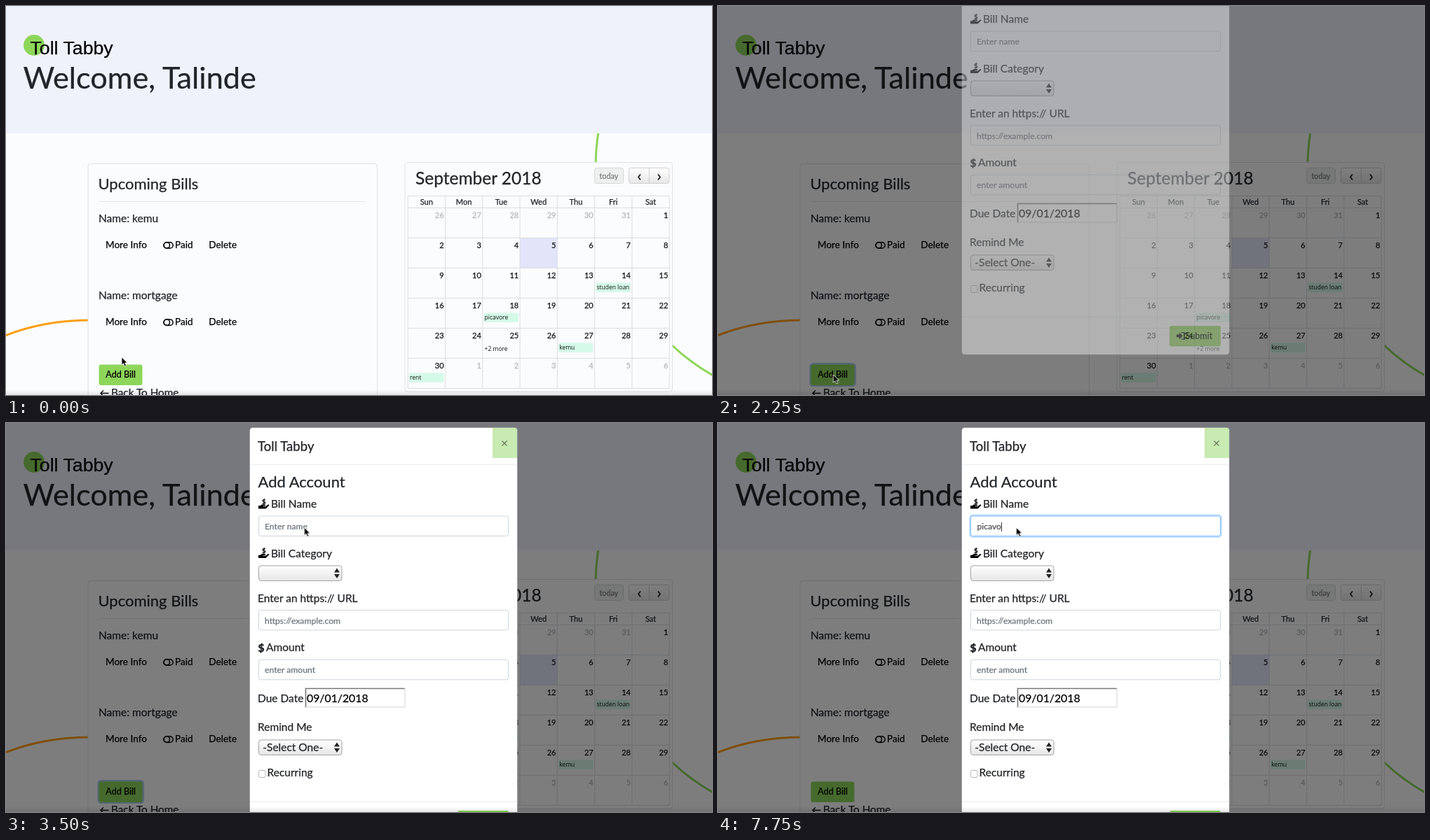
Write an HTML page that moves like this. It is 1007x556 px and loops after 8000 ms.

```html
<!DOCTYPE html>
<html lang="en">
<head>
<meta charset="utf-8">
<title>Upcoming bills</title>
<style>
  html, body { margin: 0; width: 100%; height: 100%; overflow: hidden; background: #fbfcfe; }
  svg { position: absolute; left: 0; top: 0; width: 1007px; height: 556px; }
  text {
    font-family: Lato, sans-serif; color: #212529; white-space: pre;
    fill: currentColor; stroke: currentColor; stroke-width: .25px;
  }
  .label { font-size: 15.5px; }
  .title { font-size: 22px; }
  .link { font-size: 13.6px; color: #000; }
  .button { font-size: 12.6px; color: #000; }
  .hint { font-size: 12.2px; color: #6c757d; }
  .day { font-size: 11px; color: #111; text-anchor: end; }
  .head { font-size: 11.1px; text-anchor: middle; }
  .event { font: 8.5px "Open Sans", sans-serif; color: #111; stroke: none; }
  .option { font: 600 10.2px Inter, sans-serif; color: #000; stroke: none; }
  .brand { font: 26.7px "Liberation Sans", Arial, sans-serif; color: #000; }
  .box { fill: #fff; stroke: #ced4da; }

  #ring, #shade, #modal, #focus, #hint, #list, #typed, #typed::before, #cursor {
    animation: 8s step-end infinite;
  }
  #ring { animation-name: ring; }
  #shade { animation-name: shade; }
  #modal { animation-name: modal; }
  #focus, #typed { animation-name: focus; }
  #hint { animation-name: hint; }
  #list { animation-name: list; }
  #cursor { animation-name: cursor; }

  #typed {
    position: absolute; left: 369.5px; top: 132.5px; height: 29px;
    font: 12.2px/29px Lato, sans-serif; color: #495057; white-space: pre;
    -webkit-text-stroke: .25px;
  }
  #typed::before { content: ""; animation-name: typing; }
  #typed::after {
    content: ""; display: inline-block; width: 1px; height: 13px;
    background: #333; vertical-align: middle;
  }

  @keyframes ring { 0% { opacity: 0 } 25% { opacity: 1 } 75%, 100% { opacity: 0 } }
  @keyframes shade { 0% { opacity: 0 } 28.125%, 100% { opacity: .5 } }
  @keyframes modal {
    0% { opacity: 0; transform: translateY(-97px) }
    28.125% { opacity: .4; transform: translateY(-97px) }
    31.25%, 100% { opacity: 1; transform: none }
  }
  @keyframes focus { 0% { opacity: 0 } 75%, 100% { opacity: 1 } }
  @keyframes hint { 0% { opacity: 1 } 81.25%, 100% { opacity: 0 } }
  @keyframes list {
    0% { opacity: 0 } 75% { opacity: .97 } 78.125% { opacity: 1 } 84.375%, 100% { opacity: 0 }
  }
  @keyframes typing {
    0% { content: "" }
    81.25% { content: "p" }
    87.5% { content: "pi" }
    90.625% { content: "pic" }
    93.75% { content: "picav" }
    96.875%, 100% { content: "picavo" }
  }
  @keyframes cursor {
    0% { transform: translate(165px, 502px) }
    3.125% { transform: translate(159px, 520.5px) }
    6.25% { transform: translate(158px, 521.5px) }
    18.75% { transform: translate(164.5px, 540px) }
    21.875% { transform: translate(164.5px, 527px) }
    31.25% { transform: translate(172px, 517px) }
    34.375% { transform: translate(444px, 238px) }
    37.5% { transform: translate(428px, 201px) }
    40.625% { transform: translate(425.5px, 155px) }
    43.75%, 100% { transform: translate(425.5px, 149.5px) }
  }
</style>
</head>
<body>
<svg viewBox="0 0 1007 556">
  <defs>
    <linearGradient id="grey" x2="0" y2="1">
      <stop stop-color="#fff"/><stop offset="1" stop-color="#e6e6e6"/>
    </linearGradient>
    <linearGradient id="edge" x2="0" y2="1">
      <stop stop-opacity="0"/><stop offset="1" stop-opacity=".09"/>
    </linearGradient>
    <filter id="soft" x="-5%" y="-30%" width="110%" height="170%">
      <feDropShadow dx="0" dy="3" stdDeviation="4" flood-opacity=".28"/>
    </filter>
    <g id="hand">
      <path d="M0 10.2h2.6l2.2-1.7h4.4q1.4.2 1 1.5l-.5.6h-3v.7h3.8l3-2.5q1.4-.6 2 .7l-4.4 4.4-1 .5H0z"/>
      <text x="5.2" y="7.6" font-size="9" font-weight="900">$</text>
    </g>
    <g id="toggle" fill="none" stroke="#000" stroke-width="1.5">
      <rect x=".7" y="-4.3" width="13.2" height="8.6" rx="4.3"/>
      <circle cx="5" r="4.2"/>
    </g>
    <g id="bill">
      <text class="link" x="142" y="346">More Info</text>
      <use href="#toggle" x="224.3" y="342"/>
      <text class="link" x="241" y="346">Paid</text>
      <text class="link" x="289.3" y="346">Delete</text>
    </g>
    <g id="select">
      <rect x="360.5" y=".5" width="118.5" height="21.5" rx="3.5" fill="url(#grey)" stroke="#a3a3a3"/>
      <path d="M468 10l4-6 4 6zM468 12.5l4 6 4-6z" fill="#222"/>
    </g>
  </defs>

  <rect width="1007" height="556" fill="#fbfcfe"/>
  <g fill="none" stroke-width="3">
    <path d="M-2 471.5Q52 449.5 119 449" stroke="#ff9f10"/>
    <path d="M845 180Q841.5 202 841 226M949 484Q975 509 1009 528.5" stroke="#8ed65a"/>
  </g>
  <rect width="1007" height="182" fill="#eff2fb"/>
  <circle cx="40" cy="56" r="15" fill="#8ed65a"/>
  <text class="brand" x="34.5" y="68.5">Toll Tabby</text>
  <text x="24.5" y="118" font-size="43.3">Welcome, Talinde</text>

  <rect x="117" y="225.5" width="412.5" height="350" rx="4" fill="#fbfcfe" stroke="#e1e2e5"/>
  <text class="title" x="131.5" y="261.5">Upcoming Bills</text>
  <path d="M133 279.5H514" stroke="#e3e4e7"/>
  <text class="label" x="132" y="309">Name: kemu</text>
  <use href="#bill"/>
  <text class="label" x="132" y="419">Name: mortgage</text>
  <use href="#bill" y="110.3"/>
  <rect id="ring" x="131.5" y="511" width="64.5" height="32" rx="4.5" fill="#a9cdec" stroke="#a9cdec" stroke-width="2"/>
  <rect x="132.5" y="512.5" width="62" height="29.5" rx="3" fill="#8ed65a"/>
  <text class="button" x="142.3" y="531.3">Add Bill</text>
  <path d="M146.5 553.5H135M139 549.5l-4 4 4 4" fill="none" stroke="#111" stroke-width="1.4"/>
  <text x="150" y="558.3" font-size="15.3">Back To Home</text>

  <rect x="569" y="223.5" width="381.5" height="328" rx="4" fill="#fbfcfe" stroke="#e1e2e5"/>
  <text x="584" y="254.5" font-size="24.5">September 2018</text>
  <rect x="839.5" y="231.5" width="41" height="22" rx="3" fill="#eeefef" stroke="#d6d7d8"/>
  <text x="846.5" y="246.5" font-size="10.8" style="color:#7d7d7d">today</text>
  <rect x="888.5" y="231.5" width="57.5" height="22" rx="3" fill="url(#grey)" stroke="#cfcfcf"/>
  <path d="M917.5 232v21" stroke="#cfcfcf"/>
  <path d="M905 240.5l-3 4 3 4M930 240.5l3 4-3 4" fill="none" stroke="#222" stroke-width="1.8"/>
  <g id="calendar"></g>

  <rect id="shade" width="1007" height="556"/>

  <g id="modal">
    <rect x="347.5" y="6.5" width="382" height="589" rx="4.5" fill="#fff" stroke="#000" stroke-opacity=".2"/>
    <path d="M348 59.5H729M348 541.5H729" stroke="#e9ecef"/>
    <path d="M694 7h31q4 0 4 4v39h-35z" fill="#c7ebb0"/>
    <path d="M707.5 25.5l7 7m0-7l-7 7" stroke="#6d7d64" stroke-width="1.3"/>
    <text x="359" y="39.5" font-size="18.6">Toll Tabby</text>
    <text class="title" x="359.5" y="92.3">Add Account</text>

    <use href="#hand" x="360" y="108"/>
    <text class="label" x="378" y="121">Bill Name</text>
    <rect class="box" x="360.5" y="133" width="356" height="28.5" rx="3"/>
    <g id="focus">
      <rect x="359.3" y="131.8" width="358.4" height="30.9" rx="4" fill="none" stroke="#bfdeff" stroke-width="2.4"/>
      <rect x="360.5" y="133" width="356" height="28.5" rx="3" fill="#fff" stroke="#80bdff"/>
    </g>
    <text id="hint" class="hint" x="369" y="151.6">Enter name</text>

    <use href="#hand" x="360" y="178.5"/>
    <text class="label" x="378" y="191.6">Bill Category</text>
    <use href="#select" y="203.5"/>

    <text class="label" x="359" y="256">Enter an https:// URL</text>
    <rect class="box" x="360.5" y="267.5" width="356" height="28.5" rx="3"/>
    <text class="hint" x="369" y="286.6">https://example.com</text>

    <text class="label" x="359.5" y="326.5" font-weight="900">$</text>
    <text class="label" x="371" y="326.4">Amount</text>
    <rect class="box" x="360.5" y="338.3" width="356" height="28.5" rx="3"/>
    <text class="hint" x="369" y="357">enter amount</text>

    <text class="label" x="359" y="399">Due Date</text>
    <path d="M427.5 406.5V379.5H569" fill="none" stroke="#777" stroke-width="1.6"/>
    <path d="M427.5 406H569V379.5" fill="none" stroke="#d4d4d4"/>
    <text x="429" y="399" font-size="15.8" style="color:#000">09/01/2018</text>

    <text class="label" x="359" y="440.4">Remind Me</text>
    <use href="#select" y="452.5"/>
    <text class="label" x="366.3" y="469.4">-Select One-</text>
    <rect x="360.5" y="496.5" width="9.5" height="10" rx="2" fill="#fff" stroke="#b5b5b5"/>
    <text class="label" x="372.5" y="505">Recurring</text>

    <rect x="644" y="554" width="73" height="29.5" rx="3" fill="#8ed65a"/>
    <path d="M654 566.5h4v-3l5 5-5 5v-3h-4zM661 563h4q1 0 1 1v9q0 1-1 1h-4v-1.6h3.2v-7.8H661z"/>
    <text class="button" x="666.5" y="573">Submit</text>
  </g>

  <g id="list">
    <rect x="359.5" y="162" width="358.5" height="57.5" fill="#fff" stroke="#858585" filter="url(#soft)"/>
    <text class="option" x="366.5" y="176.5">kemu</text>
    <text class="option" x="366.5" y="194.7">luza</text>
    <text class="option" x="366.5" y="213">student loan</text>
  </g>
  <rect y="548" width="1007" height="8" fill="url(#edge)"/>
</svg>

<div id="typed"></div>

<svg viewBox="0 0 1007 556">
  <path id="cursor" d="M0 0V11.2L2.6 8.8 4.4 13 6.5 12.1 4.7 8H8.2z" fill="#000" stroke="#fff" stroke-width=".8"/>
</svg>

<script>
  const calendar = document.getElementById('calendar');
  const left = 573.2, first = 288.5, colW = 373 / 7, rowH = 43;
  const x = col => left + col * colW;
  const y = row => first + row * rowH;
  const parts = [];
  const text = (cls, tx, ty, value, extra = '') =>
    parts.push(`<text class="${cls}" x="${tx}" y="${ty}" ${extra}>${value}</text>`);

  // today
  parts.push(`<rect x="${x(3)}" y="${y(1)}" width="${colW}" height="${rowH}" fill="#e2e5fa"/>`);

  let grid = `M${left} 271.5h373`;
  for (let row = 0; row < 7; row++) grid += `M${left} ${y(row)}h373`;
  for (let col = 0; col < 8; col++) grid += `M${x(col)} 271.5V546.5`;
  parts.push(`<path d="${grid}" stroke="#dcdde0" fill="none"/>`);

  'Sun Mon Tue Wed Thu Fri Sat'.split(' ')
    .forEach((name, col) => text('head', x(col + .5), 284, name));

  for (let i = 0; i < 42; i++) {
    const date = new Date(2018, 7, 26 + i);
    const row = Math.floor(i / 7);
    const faded = date.getMonth() === 8 ? '' : 'opacity=".3"';
    text('day', x(i % 7 + 1) - 1.9, y(row) + 14.4, date.getDate(), faded);
  }

  const events = [[5, 2, 'studen loan'], [2, 3, 'picavore'], [4, 4, 'kemu'], [0, 5, 'rent']];
  for (const [col, row, name] of events) {
    parts.push(`<rect x="${x(col) + 1.7}" y="${y(row) + 21}" width="49.5" height="13.5" rx="2" fill="#d5fae8"/>`);
    text('event', x(col) + 2.8, y(row) + 30.6, name);
  }
  text('event', x(2) + 2.8, y(4) + 32, '+2 more');

  calendar.innerHTML = parts.join('');
</script>
</body>
</html>
```
